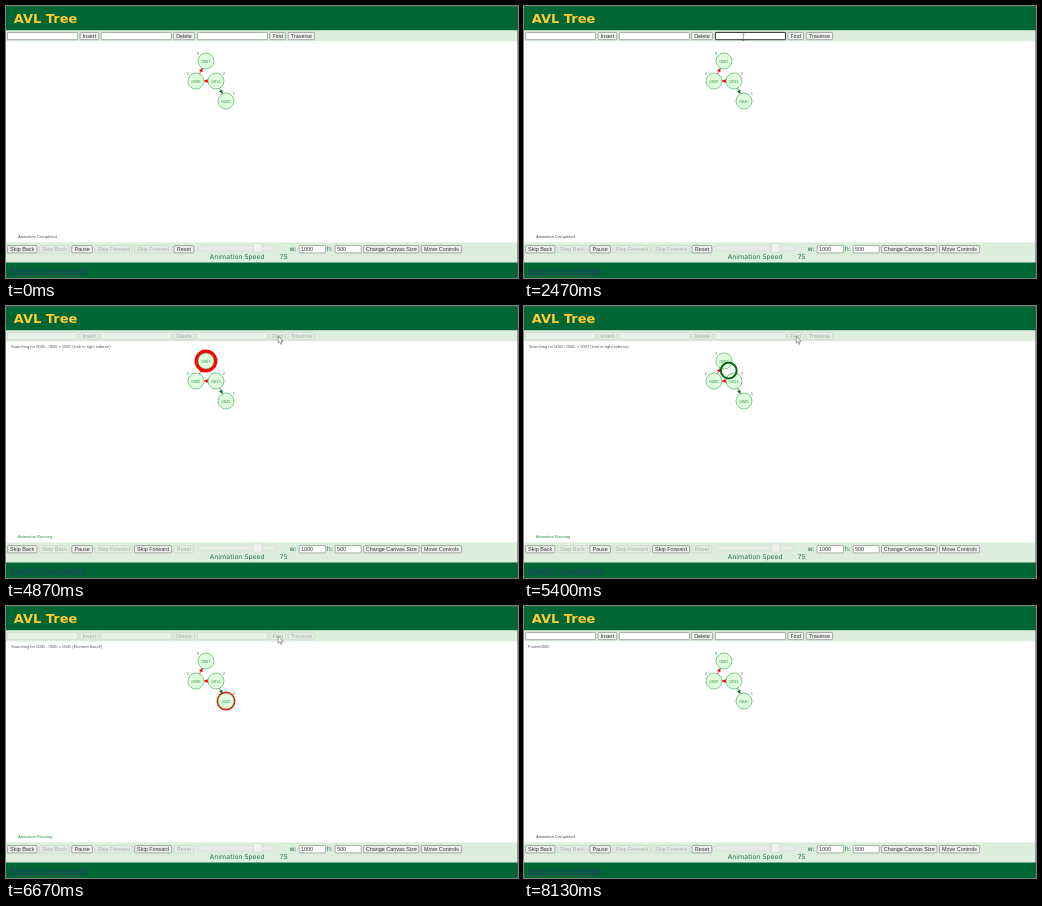
Recreate the animation shown at these times as an HTML page. Size 512x272 px, loop 8540 ms.

```html
<!DOCTYPE html>
<html lang="en">
<head>
<meta charset="utf-8">
<title>AVL Tree</title>
<style>
html, body { margin: 0; width: 100%; height: 100%; overflow: hidden; background: #fff; }
svg { display: block; width: 512px; height: 272px; }
text { font-family: "Liberation Sans", Arial, sans-serif; white-space: pre; }
.wide { font-family: "DejaVu Sans", Verdana, sans-serif; }
.small { font-size: 4.05px; }
.btn rect { fill: #efefef; stroke: #858a85; stroke-width: .7; }
.btn text { fill: #333; font-size: 5.45px; text-anchor: middle; }
.btn.hover rect { fill: #e5e5e5; stroke: #666; }
.btn.press rect { fill: #f5f5f5; stroke: #555; }
.btn.off rect { fill: #e2ece2; stroke: #ccd6cc; }
.btn.off text { fill: #a6b0a6; }
.field rect { fill: #fff; stroke: #8a8f8a; stroke-width: .7; }
.field text { fill: #333; font-size: 5.45px; }
.field.off rect { fill: #e9f2e9; stroke: #ccd6cc; }
.field.focus rect { stroke: #222; stroke-width: .95; }
</style>
</head>
<body>
<svg id="stage" viewBox="0 0 512 272"></svg>
<script>
const LOOP = 8540, FPS = 15;
const stage = document.getElementById('stage');

function add(tag, attrs, parent = stage, label) {
  const el = document.createElementNS('http://www.w3.org/2000/svg', tag);
  for (const key in attrs) el.setAttribute(key, attrs[key]);
  if (label !== undefined) el.textContent = label;
  parent.appendChild(el);
  return el;
}
const rect = (x, y, width, height, fill) => add('rect', { x, y, width, height, fill });
const show = (el, on) => el.setAttribute('visibility', on ? 'visible' : 'hidden');

const TOP = 26.4, BOTTOM = 239.6, HIGH = 7.3;

function box(kind, x, y, w) {
  const g = add('g', { class: kind });
  add('rect', { x, y, width: w, height: HIGH, rx: kind === 'btn' ? 1 : .4 }, g);
  return g;
}
function button(label, x, right, y) {
  const g = box('btn', x, y, right - x);
  add('text', { x: (x + right) / 2, y: y + 5.5 }, g, label);
  return g;
}
function field(x, w, y, value = '') {
  const g = box('field', x, y, w);
  g.label = add('text', { x: x + 1.8, y: y + 5.5 }, g, value);
  return g;
}
const wide = (x, y, size, fill, label, weight = 400) =>
  add('text', { class: 'wide', x, y, 'font-size': size, fill, 'font-weight': weight }, stage, label);

// Page bands
rect(0, 0, 512, 24.5, '#006633');
rect(0, 0, 512, .6, '#3d6b55');
rect(0, 24.5, 512, 10.8, '#ddeedd');
rect(0, 236.4, 512, 20.2, '#ddeedd');
rect(0, 256.5, 512, 15.5, '#006633');
wide(7.8, 17.1, 13, '#ffcc33', 'AVL Tree', 700);
wide(4, 267, 6.3, '#263a70', 'Algorithm Visualizations').setAttribute('text-decoration', 'underline');

// Top controls
const fields = [1.4, 95.2, 191.4].map(x => field(x, 70.2, TOP));
const topButtons = [['Insert', 74, 92.8], ['Delete', 167.4, 188.6], ['Find', 263.8, 279.6], ['Traverse', 282.2, 308.6]]
  .map(b => button(...b, TOP));
const findField = fields[2], findButton = topButtons[2];
const caret = rect(193, 27, .6, 6, '#333');

// Bottom controls
const [skipBack, stepBack, pause, stepForward, skipForward, reset] = [
  ['Skip Back', 1.4, 31], ['Step Back', 33.6, 63.4], ['Pause', 65.8, 86.4], ['Step Forward', 88.8, 126.4],
  ['Skip Forward', 128.6, 165.6], ['Reset', 168, 187.8], ['Change Canvas Size', 357.6, 413], ['Move Controls', 415.4, 455.6]
].map(b => button(...b, BOTTOM));
stepBack.classList.add('off');
stepForward.classList.add('off');
add('rect', { x: 192, y: 239.4, width: 78.6, height: 5.4, rx: 1, fill: '#e6ebe6', stroke: '#d3dad3', 'stroke-width': .6 });
add('rect', { x: 247.4, y: 237.6, width: 8.6, height: 8.6, rx: 1, fill: '#f0f1f0', stroke: '#d0d4d0', 'stroke-width': .6 });
const ink = '#22734a';
wide(203.8, 253.2, 6.4, ink, 'Animation Speed');
wide(273.4, 253.2, 6.4, ink, '75');
wide(283.6, 245.3, 6.4, ink, 'w:');
wide(320.8, 245.3, 6.4, ink, 'h:');
field(293.2, 26.4, BOTTOM, '1000');
field(329.2, 26, BOTTOM, '500');

// Canvas text
const message = add('text', { class: 'small', x: 4.6, y: 42.2, fill: '#555' });
const status = add('text', { class: 'small', x: 12, y: 232.4 });

// Tree
const nodes = [['0007', '3', 200, 55], ['0006', '2', 190, 75], ['0013', '2', 210, 75], ['0045', '1', 220, 95]]
  .map(([key, height, x, y]) => ({ key, height, x, y }));
const [root, left, mid, leaf] = nodes;

function edge(a, b, color) {
  const dx = b.x - a.x, dy = b.y - a.y, len = Math.hypot(dx, dy);
  const g = add('g', {
    transform: `translate(${a.x} ${a.y}) rotate(${Math.atan2(dy, dx) * 180 / Math.PI})`
  });
  const tip = len - 8;
  add('path', { d: `M8 0H${tip}`, stroke: color, 'stroke-width': .6 }, g);
  add('path', { d: `M${tip} 0l-3.7 -1.9v3.8z`, fill: color }, g);
}
for (const n of nodes) {
  n.glow = add('circle', { cx: n.x, cy: n.y, r: 8, fill: '#ff0000' });
  add('circle', { cx: n.x, cy: n.y, r: 8, fill: '#dfffdf', stroke: '#4aab58', 'stroke-width': .65 });
  const style = { class: 'small', 'text-anchor': 'middle', fill: '#348a44' };
  add('text', { ...style, x: n.x, y: n.y + 1.5 }, stage, n.key);
  add('text', { ...style, x: n.x + (n === root || n === left ? -8 : 8), y: n.y - 6.3 }, stage, n.height);
}
edge(left, root, '#ee0000');
edge(mid, left, '#ee0000');
edge(mid, leaf, '#006622');
const ring = add('circle', { r: 7.9, fill: 'none', stroke: '#006414', 'stroke-width': 2 });

// Pointers
const arrow = add('path', {
  d: 'M0 0V7L1.6 5.6L2.7 8.1L3.8 7.6L2.7 5.2H4.9Z', fill: '#fff', stroke: '#555', 'stroke-width': .55
});
const beam = add('path', { d: 'M-1.2 -3.2H1.2M0 -3.2V3.2M-1.2 3.2H1.2', fill: 'none', stroke: '#666', 'stroke-width': .55 });

// Right edge of the window
rect(511, 0, 1, 272, 'rgba(80, 80, 80, .5)');

const hold = () => 0;
const out = p => 1 - (1 - p) ** 2.2;
const smooth = p => p * p * (3 - 2 * p);
// time, x, y, easing towards the next stop
const path = [
  [67, 507, 265, out], [800, 219.3, 31.6, hold], [1200, 219.8, 31.9, hold], [2200, 219.4, 31.3, hold],
  [2467, 219.6, 31.1, hold], [2533, 219.8, 31.3, hold], [3467, 219.8, 31.3, smooth],
  [3933, 275, 30.8, hold], [4067, 274.6, 30.6, hold], [4400, 274.6, 30.6, smooth],
  [4733, 272.2, 30.2, hold], [6733, 271, 30.2, hold], [7533, 271, 30.2, p => p ** 1.5],
  [8130, 22, 290, hold]
];

function pointer(t) {
  let i = path.length - 1;
  while (i > 0 && path[i][0] > t) i--;
  const a = path[i], b = path[i + 1] || a;
  const p = b === a ? 0 : a[3]((t - a[0]) / (b[0] - a[0]));
  return [a[1] + (b[1] - a[1]) * p, a[2] + (b[2] - a[2]) * p];
}

const CLICK = 1666, TYPE = [2930, 3262], BLUR = 4660, START = 4860, STEP = 366, BLINK = 530;
const END = START + 5 * STEP;

function drawTyping(t) {
  const focus = t >= CLICK && t < BLUR;
  const typed = TYPE.filter(x => t >= x);
  const value = t < START ? '45'.slice(0, typed.length) : '';
  const since = t - Math.max(CLICK, ...typed);
  findField.label.textContent = value;
  findField.classList.toggle('focus', focus);
  caret.setAttribute('x', 192.9 + value.length * 3.03);
  show(caret, focus && Math.floor(since / BLINK) % 2 === 0);
}

function drawSearch(t) {
  const running = t >= START && t < END;
  const step = running ? Math.floor((t - START) / STEP) : -1;
  const part = (t - START) / STEP - step;
  const visited = [root, mid, leaf];
  const at = visited[step >> 1];
  const moving = step % 2 === 1;

  const pulse = Math.abs((t - START) / 30 % 14 - 7) / 2;
  for (const n of nodes) n.glow.setAttribute('r', running && !moving && n === at ? 8 + pulse : 7);
  show(ring, moving);
  if (moving) {
    const next = visited[(step >> 1) + 1];
    ring.setAttribute('cx', at.x + (next.x - at.x) * part);
    ring.setAttribute('cy', at.y + (next.y - at.y) * part);
  }

  const verdict = at === leaf ? '= 0045 (Element found!)' : at && `> ${at.key} (look to right subtree)`;
  message.textContent = running ? `Searching for 0045 : 0045 ${verdict}` : t >= END ? 'Found:0045' : '';
  message.setAttribute('x', running ? 5 : 4);
  status.textContent = running ? 'Animation Running' : 'Animation Completed';
  status.setAttribute('fill', running ? '#2f8f49' : '#555');
  for (const el of [...fields, ...topButtons, reset]) el.classList.toggle('off', running);
  skipForward.classList.toggle('off', !running);
  return running;
}

function drawPointer(t, running) {
  const [x, y] = pointer(t);
  const visible = t >= 66 && t < 8125;
  const inField = x > 191 && x < 262 && y > 25.5 && y < 34;
  const onFind = visible && x > 263.5 && x < 280 && y > 25.5 && y < 34;
  for (const el of [arrow, beam]) el.setAttribute('transform', `translate(${x} ${y})`);
  show(arrow, visible && !inField);
  show(beam, visible && inField);
  findButton.classList.toggle('hover', onFind && !running);
  findButton.classList.toggle('press', t >= BLUR && t < 4790);
}

function draw(time) {
  const t = Math.floor((time % LOOP + 5) * FPS / 1000) * 1000 / FPS;
  drawTyping(t);
  drawPointer(t, drawSearch(t));
}

const begin = performance.now();
function tick() {
  draw(performance.now() - begin);
  requestAnimationFrame(tick);
}
tick();
</script>
</body>
</html>
```
